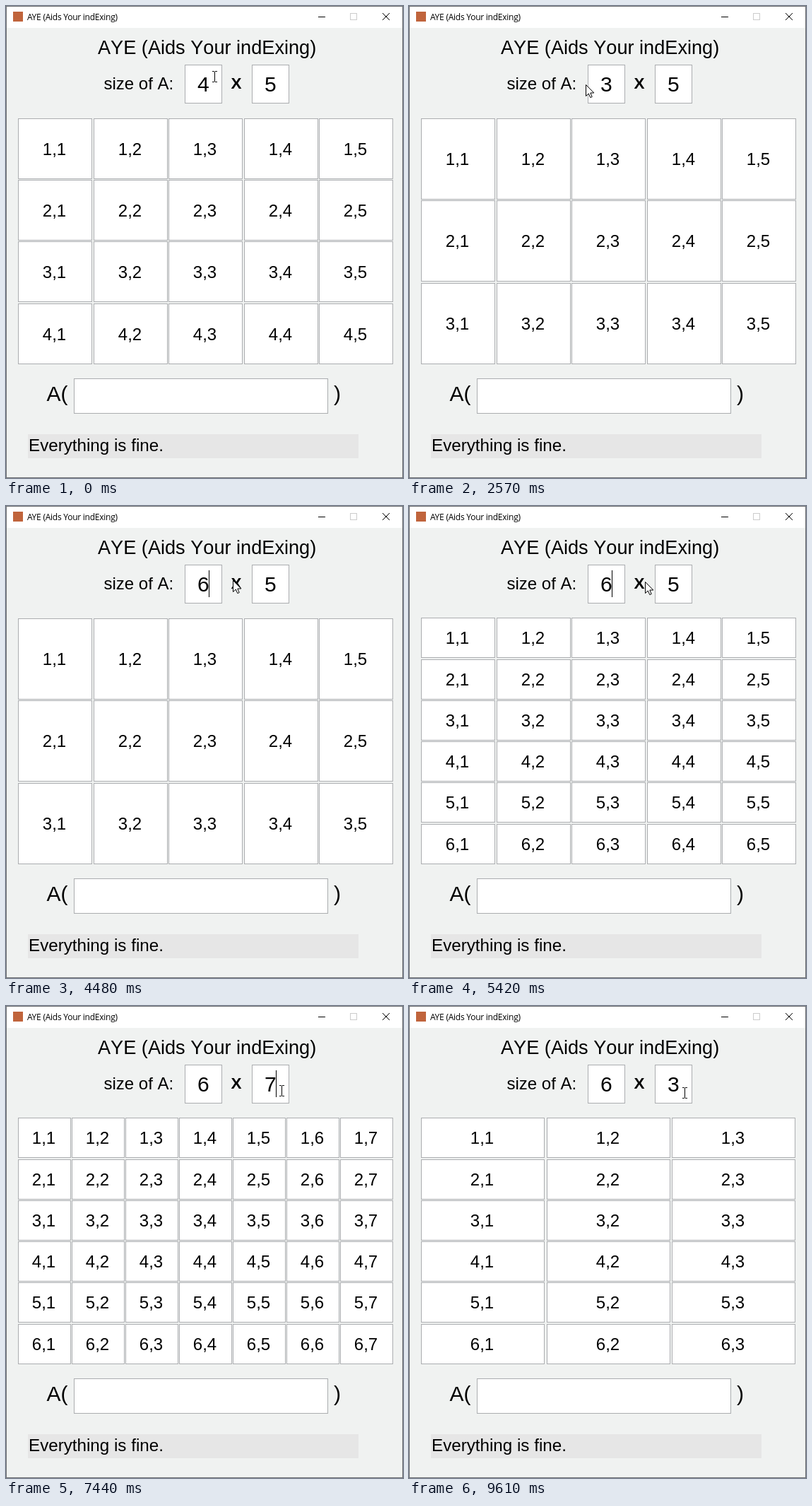
Animation of 562x668 px, one loop 9.69 s. Source, as an HTML page:

```html
<!DOCTYPE html>
<html lang="en">
<head>
<meta charset="utf-8">
<title>AYE</title>
<style>
html, body { margin: 0; width: 100%; height: 100%; overflow: hidden; background: #f0f2f1; }
svg { display: block; width: 562px; height: 668px; font-family: "Liberation Sans", Arial, sans-serif; font-kerning: none; }
rect, .crisp { shape-rendering: crispEdges; }
text { white-space: pre; }
.bar { font: 12px "Open Sans", sans-serif; letter-spacing: -.25px; }
.box { fill: #fff; stroke: #abadb0; }
.cell { font-size: 24px; text-anchor: middle; }
.edit { font-size: 30px; }
</style>
</head>
<body>
<svg viewBox="0 0 562 668">
  <rect width="562" height="668" fill="#f0f2f1"/>
  <rect width="562" height="31" fill="#fff"/>
  <rect x=".5" y=".5" width="561" height="667" fill="none" stroke="#707274"/>
  <rect x="10" y="8" width="14" height="14" fill="#c0643c"/>
  <text class="bar" x="30" y="20">AYE (Aids Your indExing)</text>
  <path class="crisp" d="M442 15.5h10" stroke="#000"/>
  <rect x="487.5" y="10.5" width="9" height="9" fill="none" stroke="#ccc"/>
  <path d="M533 10l10 10M543 10l-10 10" stroke="#000"/>
  <text x="130" y="68" font-size="27.15">AYE (Aids Your indExing)</text>
  <text x="138.5" y="118" font-size="24">size of A:</text>
  <text x="326" y="117" font-size="22.5" font-weight="bold" text-anchor="middle">X</text>
  <rect class="box" x="253.5" y="83.5" width="52" height="54"/>
  <rect class="box" x="348.5" y="83.5" width="52" height="54"/>
  <rect id="mark" y="91" width="17" height="38" fill="#0078d7"/>
  <text id="rowNum" class="edit" x="271" y="121"></text>
  <text id="colNum" class="edit" x="366" y="121"></text>
  <rect id="caret" y="91" width="1" height="38"/>
  <g id="grid"></g>
  <text class="edit" x="57.5" y="559">A(</text>
  <rect class="box" x="96.5" y="527.5" width="359" height="49"/>
  <text class="edit" x="464" y="559">)</text>
  <rect x="31" y="606" width="468" height="34" fill="#e6e6e6"/>
  <text x="32" y="630" font-size="24.2">Everything is fine.</text>
  <path id="arrow" d="M.5 .5V16.5L4.3 13L6.8 18.6L9.2 17.5L6.8 12H11.8Z" fill="#fff" stroke="#000"/>
  <path id="beam" class="crisp" d="M-3 -7.5H0M1 -7.5H4M.5 -7V7M-3 7.5H0M1 7.5H4" stroke="#000"/>
</svg>
<script>
const LOOP = 9690, BLINK = 480, SELECT = 200, APPLY = 420;
const digitLeft = [271, 366];
const $ = id => document.getElementById(id);

// Pointer strokes: even steps along a few key points
const strokes = [
  { from: 80, to: 530, steps: 6, path: [[295, 100], [284, 112], [290, 112]] },
  { from: 1010, to: 1470, steps: 6, path: [[290, 112], [238, 111], [250, 111]] },
  { from: 3190, to: 4030, steps: 10, path: [[250, 111], [268, 111], [321, 105]] },
  { from: 5330, to: 6260, steps: 10, path: [[321, 105], [363, 112], [403, 113], [390, 120]] },
  { from: 7510, to: 8530, steps: 12, path: [[390, 120], [351, 116], [383, 116], [390, 119]] },
  { from: 8760, to: 9040, steps: 4, path: [[390, 119], [390, 123]] }
];

// Each edit drags over a digit, types a new one, then applies it
const edits = [
  { field: 0, press: 1010, type: 2080, value: 3, backward: true },
  { field: 0, press: 3480, type: 4270, value: 6, backward: false },
  { field: 1, press: 5640, type: 6410, value: 7, backward: false },
  { field: 1, press: 7960, type: 8760, value: 3, backward: false }
];

function pointer(t) {
  const { from, to, steps, path } = strokes.filter(s => t >= s.from).pop() || strokes[0];
  const step = t < from ? 0 : Math.floor((t - from) / (to - from) * (steps - 1)) + 1;
  const u = Math.min(1, step / steps) * (path.length - 1);
  const i = Math.min(path.length - 2, Math.floor(u));
  return path[i].map((a, k) => Math.round(a + (path[i + 1][k] - a) * (u - i)));
}

function sizeAt(t, delay) {
  const size = [4, 5];
  for (const e of edits) if (t >= e.type + delay) size[e.field] = e.value;
  return size;
}

function gridMarkup(rows, cols) {
  const dx = 532 / cols, dy = 349.3 / rows;
  const w = Math.floor(dx * .99), h = Math.floor(dy * .99);
  let out = '';
  for (let r = 1; r <= rows; r++) {
    const y = Math.round(506.55 - (rows - r) * dy) - h;
    for (let c = 1; c <= cols; c++) {
      const x = Math.round(17.4 + (c - 1) * dx);
      out += `<rect class="box" x="${x + .5}" y="${y + .5}" width="${w - 1}" height="${h - 1}"/>` +
        `<text class="cell" x="${x + w / 2 - 1}" y="${Math.floor(y + h / 2) + 9}">${r},${c}</text>`;
    }
  }
  return out;
}

function place(el, x, visible) {
  el.setAttribute('x', x);
  el.style.display = visible ? '' : 'none';
}

function drawEdit(t) {
  const e = edits.filter(e => t >= e.press).pop();
  const typed = e && t >= e.type;
  const marked = e && !typed && t >= e.press + SELECT;
  const left = e ? digitLeft[e.field] : 0;
  const atEnd = e && (typed || marked !== e.backward);
  const age = e ? t - (typed ? e.type : e.press) : 0;
  place($('mark'), left, marked);
  place($('caret'), left + (atEnd ? 16 : 0), e && age % (2 * BLINK) < BLINK);

  const size = sizeAt(t, 0);
  ['rowNum', 'colNum'].forEach((id, field) => {
    $(id).textContent = size[field];
    $(id).setAttribute('fill', marked && e.field === field ? '#fff' : '#000');
  });
}

let shown = '';
function drawGrid(t) {
  const size = sizeAt(t, APPLY), key = size.join();
  if (key !== shown) $('grid').innerHTML = gridMarkup(...size);
  shown = key;
}

function drawPointer(t) {
  const [x, y] = pointer(t);
  const inEdit = [253, 348].some(left => x >= left && x < left + 53);
  for (const id of ['arrow', 'beam']) {
    $(id).setAttribute('transform', `translate(${x} ${y})`);
    $(id).style.display = (id === 'beam') === inEdit ? '' : 'none';
  }
}

const start = performance.now();
function tick() {
  const t = (performance.now() - start) % LOOP;
  drawEdit(t);
  drawGrid(t);
  drawPointer(t);
  requestAnimationFrame(tick);
}
tick();
</script>
</body>
</html>
```
